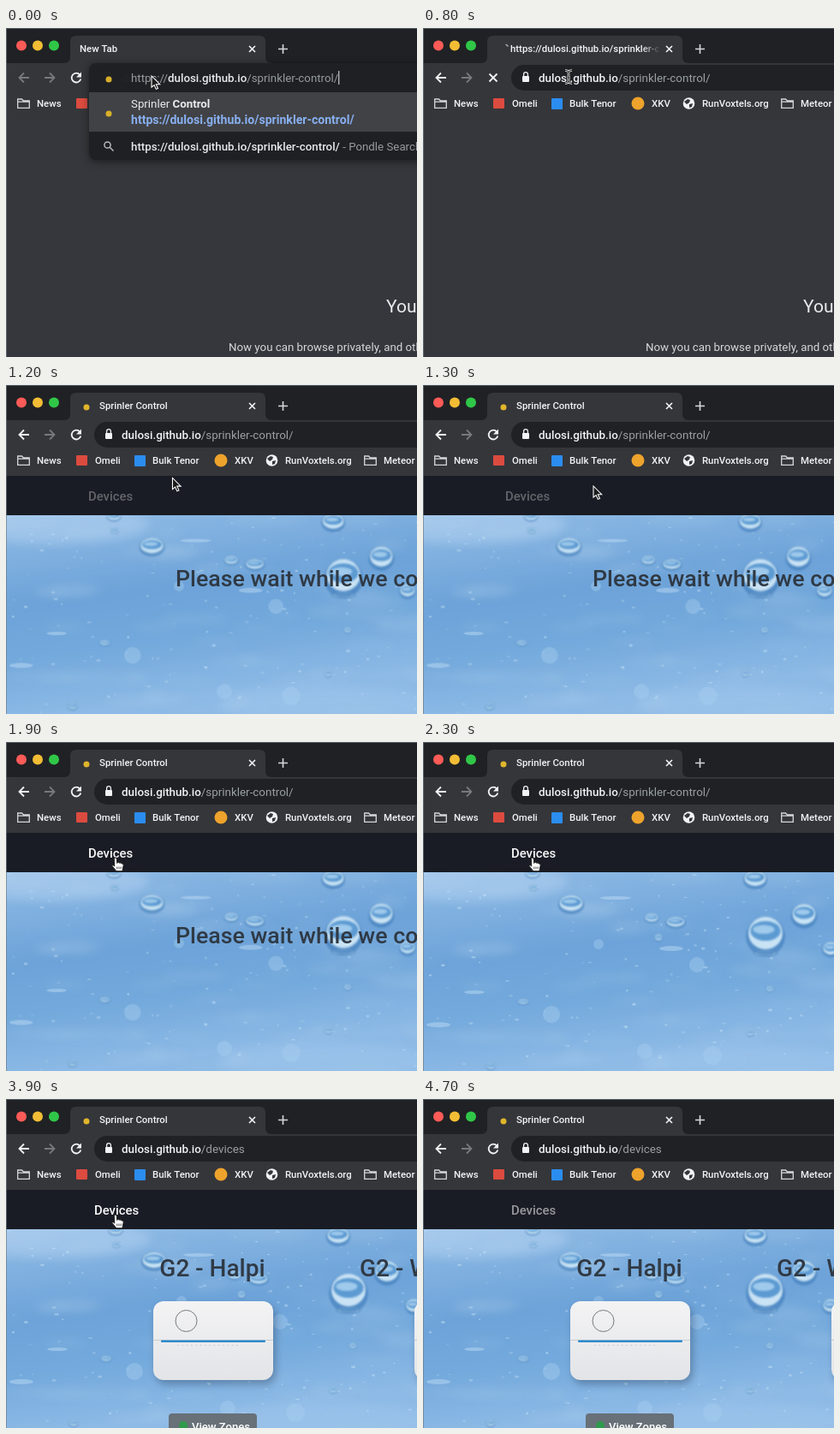
These frames come from a looping animation (480x384 px, 5200 ms). An HTML page with a canvas:

```html
<!DOCTYPE html>
<html lang="en">
<head>
<meta charset="utf-8">
<title>Sprinkler control</title>
<style>
html, body { margin: 0; width: 100%; height: 100%; overflow: hidden; background: #35363a; }
canvas { display: block; }
</style>
</head>
<body>
<canvas id="stage" width="480" height="384"></canvas>
<script>
const LOOP = 5200, STEP = 100;
const HOST = 'dulosi.github.io', HOME = '/sprinkler-control/';
const WHITE = '#f1f3f4', GREY = '#9aa0a6', DARK = '#202124', BAR = '#35363a';
const c = document.getElementById('stage').getContext('2d');

function text(s, x, y, size, color, weight = 400) {
  c.font = `${weight} ${size}px Roboto, Inter, sans-serif`;
  c.fillStyle = color;
  c.fillText(s, x, y);
  return x + c.measureText(s).width;
}

function box(x, y, w, h, r, color) {
  c.fillStyle = color;
  c.beginPath();
  c.roundRect(x, y, w, h, r);
  c.fill();
}

function disc(x, y, r, color) {
  c.fillStyle = color;
  c.beginPath();
  c.arc(x, y, r, 0, 7);
  c.fill();
}

function line(d, x, y, color, width = 1.8) {
  c.save();
  c.translate(x, y);
  c.strokeStyle = color;
  c.lineWidth = width;
  c.stroke(new Path2D(d));
  c.restore();
}

// Wet blue backdrop, painted once
function makeWater() {
  const canvas = document.createElement('canvas');
  canvas.width = 500;
  canvas.height = 240;
  const g = canvas.getContext('2d');
  let seed = 11;
  const rnd = () => (seed = seed * 16807 % 2147483647) / 2147483647;

  const sky = g.createLinearGradient(0, 0, 30, 240);
  [[0, '#97bfe7'], [.16, '#84b3e1'], [.45, '#6da3d9'], [.7, '#73a9dc'], [1, '#8dbae6']]
    .forEach(([p, color]) => sky.addColorStop(p, color));
  g.fillStyle = sky;
  g.fillRect(0, 0, 500, 240);

  const blob = (x, y, rx, ry, color) => {
    g.fillStyle = color;
    g.beginPath();
    g.ellipse(x, y, rx, ry, 0, 0, 7);
    g.fill();
  };
  const drop = (x, y, rx, ry) => {
    g.filter = 'blur(.8px)';
    blob(x, y + ry * .2, rx * 1.08, ry * 1.08, 'rgba(54,116,180,.55)');
    blob(x, y, rx * .95, ry * .9, 'rgba(222,243,253,.85)');
    blob(x, y - ry * .12, rx * .84, ry * .55, '#5c9ad2');
    blob(x - rx * .1, y - ry * .2, rx * .6, ry * .25, 'rgba(176,214,243,.8)');
    g.filter = 'none';
  };

  g.filter = 'blur(6px)';
  blob(60, 12, 110, 22, 'rgba(190,218,246,.4)');
  blob(380, 225, 130, 22, 'rgba(175,210,242,.3)');
  for (let i = 0; i < 60; i++)
    blob(rnd() * 500, rnd() * 240, 12 + rnd() * 40, 2 + rnd() * 5, 'rgba(200,226,247,.12)');
  g.filter = 'blur(.6px)';
  [[18, 178, 14, 3], [290, 89, 14, 3], [60, 140, 12, 2], [225, 30, 18, 2]]
    .forEach(s => blob(...s, 'rgba(205,230,250,.4)'));
  for (let i = 0; i < 150; i++)
    blob(rnd() * 500, rnd() * 240, .8 + rnd() * 2, .6 + rnd(), `rgba(215,238,252,${.1 + rnd() * .35})`);
  [[150, 166, 10], [320, 108, 9], [259, 209, 9], [338, 214, 11], [205, 84, 6]]
    .forEach(([x, y, r]) => blob(x, y, r, r, 'rgba(170,208,240,.4)'));
  [[400, 94, 13, 3], [173, 36, 14, 10], [400, 71, 21, 21], [445, 49, 14, 13], [388, 7, 13, 10],
   [267, 53, 8, 5], [295, 58, 11, 6], [476, 89, 9, 8], [128, 1, 8, 5], [129, 18, 4, 3],
   [275, 76, 4, 4], [117, 151, 6, 3], [382, 187, 4, 4], [79, 226, 5, 4], [405, 136, 4, 3]]
    .forEach(d => drop(...d));
  return canvas;
}
const water = makeWater();

function folder(x) {
  line('M.7 1H5.5L7.5 3H14.3V11.3H.7ZM.7 4.2H14', x, 82, '#d5d7da', 1.3);
}

function bookmarks() {
  const label = (s, x) => text(s, x, 92, 11.4, WHITE, 500);
  folder(13);
  label('News', 36);
  box(82, 82, 13, 12, 1, '#dc4b3f');
  label('Omeli', 104);
  box(150, 82, 13, 13, 1, '#2b8df0');
  label('Bulk Tenor', 171);
  disc(251, 88, 7.5, '#eda32c');
  label('XKV', 267);
  disc(310.5, 88, 6.8, WHITE);
  c.fillStyle = BAR;
  c.fill(new Path2D('M305 86 309 83 312 84 311 87 308 89ZM311 89 315 88 314 92 311 93Z'));
  label('RunVoxtels.org', 326);
  folder(418);
  label('Meteor', 441);
}

function tabStrip(t, loading) {
  c.fillStyle = DARK;
  c.fillRect(0, 0, 480, 41);
  ['#fc5b57', '#f2bd35', '#30c748'].forEach((color, i) => disc(18 + 19 * i, 20.5, 6, color));
  c.fillStyle = BAR;
  c.fill(new Path2D('M68 41Q75 41 75 34V16Q75 9 82 9H296Q303 9 303 16V34Q303 41 310 41Z'));

  if (t < 400) text('New Tab', 86, 28, 11.4, WHITE, 500);
  else if (loading) {
    const a = t / 160;
    c.strokeStyle = GREY;
    c.lineWidth = 1.6;
    c.beginPath();
    c.arc(95, 24, 5, a, a + (t < 900 ? .8 : 2.2));
    c.stroke();
    const fade = c.createLinearGradient(255, 0, 277, 0);
    fade.addColorStop(0, WHITE);
    fade.addColorStop(1, 'rgba(241,243,244,0)');
    text('https://' + HOST + '/sprinkler-c', 102, 28, 11.4, fade, 500);
  } else {
    disc(94, 26, 3.5, '#e0b52b');
    text('Sprinler Control', 109, 28, 11.4, WHITE, 500);
  }
  line('M-3.5-3.5 3.5 3.5M3.5-3.5-3.5 3.5', 287.5, 24.5, WHITE, 1.6);
  line('M-5.5 0H5.5M0-5.5V5.5', 323.5, 24.5, '#d5d7da', 1.6);
}

function toolbar(t, loading) {
  c.fillStyle = BAR;
  c.fillRect(0, 41, 480, 65);
  line('M6 0H-5M0-5.5-5.5 0 0 5.5', 21, 58, t < 400 ? '#77797d' : WHITE);
  line('M-6 0H5M0-5.5 5.5 0 0 5.5', 51, 58, '#77797d');
  if (loading) line('M-4.5-4.5 4.5 4.5M4.5-4.5-4.5 4.5', 82, 58, WHITE);
  else {
    line('M4.2-3.4A5.4 5.4 0 1 0 5.3 1.5', 82, 58, WHITE);
    c.fillStyle = WHITE;
    c.fill(new Path2D('M88 51.5V57.5H82Z'));
  }
  box(103, 43, 400, 30, 15, DARK);
  box(116, 56, 8, 7, 1, WHITE);
  line('M-2.4 0V-2A2.4 2.4 0 0 1 2.4-2V0', 120, 56, WHITE, 1.3);
  const x = text(HOST, 135, 63, 13.4, WHITE, 500);
  text(t < 3700 ? HOME : '/devices', x, 63, 13.4, GREY);
  bookmarks();
}

function popup(t) {
  const url = 'https://' + HOST + HOME;
  c.save();
  c.globalAlpha = t < 100 ? .96 : 1;
  c.shadowColor = 'rgba(0,0,0,.5)';
  c.shadowBlur = 10;
  c.shadowOffsetY = 2;
  box(97, 41, 420, 113, 8, DARK);
  c.shadowColor = 'transparent';
  c.fillStyle = '#434447';
  c.fillRect(97, 75, 383, 46);
  disc(120, 60, 3.5, '#e0b52b');
  disc(120, 100, 3.5, '#e0b52b');

  let x = text('https://', 146, 63, 13.3, GREY);
  x = text(HOST, x, 63, 13.3, WHITE, 500);
  x = text(HOME, x, 63, 13.3, GREY);
  c.fillStyle = WHITE;
  c.fillRect(x, 50, 1, 16);
  x = text('Sprinler ', 146, 93, 13.3, WHITE);
  text('Control', x, 93, 13.3, WHITE, 700);
  text(url, 146, 112, 14.1, '#8ab4f8', 700);
  line('M3 3 7 7M3.6 0A3.6 3.6 0 1 1-3.6 0A3.6 3.6 0 1 1 3.6 0', 118.5, 136.5, '#bdc1c6', 1.5);
  x = text(url, 146, 142.5, 13.3, WHITE, 500);
  text(' - Pondle Search', x, 142.5, 13.3, GREY);
  c.restore();
}

function newTabPage() {
  c.fillStyle = '#36373c';
  c.fillRect(0, 106, 480, 278);
  text('You’ve gone incognito', 444, 332, 21, '#e8eaed');
  text('Now you can browse privately, and other people', 260, 377, 13.3, '#d5d7da');
}

function device(x) {
  c.save();
  c.translate(x, 0);
  const shell = c.createLinearGradient(0, 236, 0, 328);
  shell.addColorStop(0, '#f3f3f4');
  shell.addColorStop(1, '#e3e4e7');
  c.shadowColor = 'rgba(40,60,90,.4)';
  c.shadowBlur = 10;
  c.shadowOffsetX = 3;
  c.shadowOffsetY = 5;
  box(172, 236, 140, 92, 12, shell);
  c.shadowColor = 'transparent';
  c.fillStyle = '#c9ccd0';
  c.fillRect(172, 281, 140, 1);
  box(181, 281.5, 122, 2.5, 1, '#2f8acb');
  for (let i = 0; i < 14; i++) disc(201 + i * 5.3, 287.5, .6, '#b3b6ba');
  c.strokeStyle = '#77797c';
  c.lineWidth = 1;
  c.beginPath();
  c.arc(210.5, 259, 12.5, 0, 7);
  c.stroke();
  c.restore();
}

function deviceList() {
  c.textAlign = 'center';
  text('G2 - Halpi', 241, 207, 28, '#303a45', 500);
  c.textAlign = 'left';
  text('G2 - W', 413, 207, 28, '#303a45', 500);
  device(0);
  device(305);
  box(190, 367, 103, 34, 4, '#687078');
  disc(207, 381, 5, '#2f9a4b');
  text('View Zones', 217, 386.5, 13.1, '#fff', 500);
}

function webPage(t) {
  const wet = t >= 1000, narrow = wet && t < 2200;
  c.fillStyle = '#add8e6';
  c.fillRect(0, 152, 480, 232);
  if (wet) {
    const k = narrow ? .985 : 1;
    c.drawImage(water, 0, 152, 500 * k, 240 * k);
  }
  c.fillStyle = wet ? '#191c24' : '#181f24';
  c.fillRect(0, 106, 480, 46);
  const shift = narrow ? -7 : 0;
  const glow = t < 1800 ? .32 : t < 4300 ? .97 : t < 4400 ? .75 : .55;
  text('Devices', 103 + shift, 135, 14.9, `rgba(255,255,255,${glow})`, 500);
  if (t < 2200) text('Please wait while we connect', 205 + shift, 235, 26.7, '#2f3944', 500);
  if (t >= 3700) deviceList();
}

const ARROW = new Path2D('M0 0V15L3.5 12 6 17.5 8.5 16.5 6 11H11Z');
const HAND = new Path2D('M-2 1Q0-1 1.5 1L2 7 3 6Q5 5.5 5.5 7 7.5 6 8.5 8 10.5 7.5 10.5 10L9.5 15 9 18H1L-4 12Q-5.5 9.5-3.5 9.5L-1.5 11Z');
const ROUTE = [[0, 170, 56], [900, 170, 57], [1300, 199, 118], [1500, 194, 122],
  [1900, 128, 135], [4200, 128, 135], [4700, 330, 420]];

function pointerAt(t) {
  const i = ROUTE.findIndex(p => p[0] > t);
  if (i < 0) return [330, 420];
  const [t0, x0, y0] = ROUTE[i - 1], [t1, x1, y1] = ROUTE[i];
  let k = (t - t0) / (t1 - t0);
  k *= k * (3 - 2 * k);
  return [x0 + (x1 - x0) * k, y0 + (y1 - y0) * k];
}

function pointer(t) {
  const [x, y] = pointerAt(t);
  if (t >= 500 && y < 74) {
    const beam = 'M-4-7.5Q0-7.5 0-5 0-7.5 4-7.5M0-5V5M-4 7.5Q0 7.5 0 5 0 7.5 4 7.5M-2 1H2';
    line(beam, x, y, '#e8e8e8', 2.6);
    line(beam, x, y, '#222', 1);
    return;
  }
  const hand = t >= 1800 && t < 4300;
  const pressed = t >= 2900 && t < 3200;
  const size = pressed ? .82 : .88;
  c.save();
  c.translate(x, y);
  c.scale(size, size);
  c.lineWidth = 1.2;
  c.fillStyle = hand ? '#fff' : '#1b1b1b';
  c.strokeStyle = hand ? '#222' : '#fff';
  const shape = hand ? HAND : ARROW;
  c.fill(shape);
  c.stroke(shape);
  if (hand) line('M2 12V15M4.5 12V15M7 12V15', 0, 0, '#222', .9);
  c.restore();
}

function windowEdge() {
  c.fillStyle = 'rgba(112,124,136,.7)';
  c.fillRect(0, 0, 480, 1);
  c.fillRect(0, 1, 1, 383);
}

function frame(now) {
  const t = Math.floor(now % LOOP / STEP) * STEP;
  const loading = t >= 400 && t < 1000;
  if (t < 900) newTabPage();
  else webPage(t);
  tabStrip(t, loading);
  toolbar(t, loading);
  if (t < 400) popup(t);
  windowEdge();
  pointer(t);
  requestAnimationFrame(frame);
}
requestAnimationFrame(frame);
</script>
</body>
</html>
```
